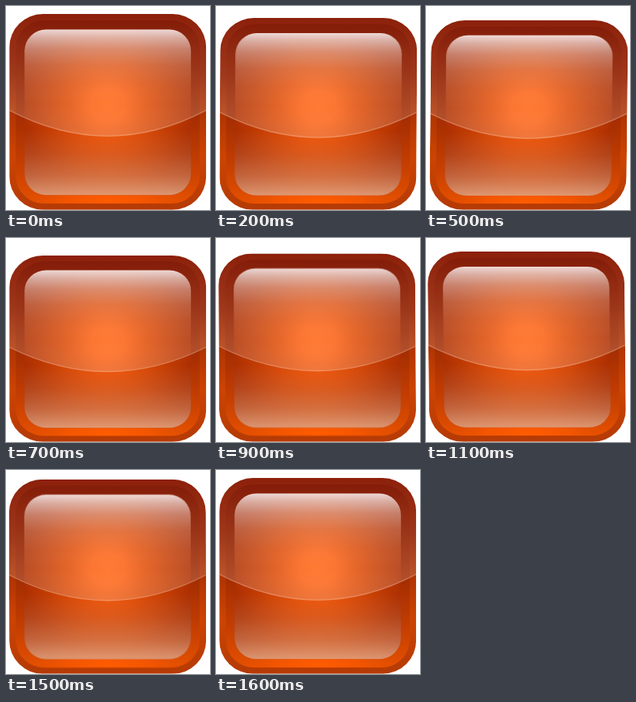
Animation, 256 px wide and 256 px high, one loop 1.7 s. Source, as an HTML page:

```html
<!DOCTYPE html>
<html lang="en">
<head>
<meta charset="utf-8">
<title>Wobbling glossy button</title>
<style>
html, body { margin: 0; width: 100%; height: 100%; overflow: hidden; background: #fff; }
svg { display: block; width: 100%; height: 100%; }
</style>
</head>
<body>
<svg viewBox="0 0 256 256">
  <defs>
    <linearGradient id="rim" x1="0" y1="0" x2="0" y2="1">
      <stop offset="0" stop-color="#8a1c06"/>
      <stop offset=".3" stop-color="#962404"/>
      <stop offset=".5" stop-color="#b03402"/>
      <stop offset=".72" stop-color="#cc4402"/>
      <stop offset="1" stop-color="#b43a06"/>
    </linearGradient>
    <linearGradient id="band" x1="0" y1="0" x2="0" y2="1">
      <stop offset="0" stop-color="#801602"/>
      <stop offset=".5" stop-color="#a22c02"/>
      <stop offset=".75" stop-color="#c03c02"/>
      <stop offset="1" stop-color="#e45000"/>
    </linearGradient>
    <radialGradient id="glow" gradientUnits="userSpaceOnUse" cx="0" cy="0" r="1" gradientTransform="translate(123 234) scale(105 30)">
      <stop offset="0" stop-color="#ff5c00"/>
      <stop offset=".5" stop-color="#fa5800" stop-opacity=".7"/>
      <stop offset="1" stop-color="#e45000" stop-opacity="0"/>
    </radialGradient>
    <radialGradient id="core" gradientUnits="userSpaceOnUse" cx="123" cy="114" r="140">
      <stop offset="0" stop-color="#ff6412"/>
      <stop offset=".15" stop-color="#fb5f10"/>
      <stop offset=".35" stop-color="#e04c06"/>
      <stop offset=".55" stop-color="#c63e04"/>
      <stop offset=".75" stop-color="#ae3002"/>
      <stop offset="1" stop-color="#962400"/>
    </radialGradient>
    <linearGradient id="shine" x1="0" y1="0" x2="0" y2="1">
      <stop offset="0" stop-color="#f8f2f6" stop-opacity=".86"/>
      <stop offset=".05" stop-color="#f0e8ec" stop-opacity=".66"/>
      <stop offset=".12" stop-color="#eee0e4" stop-opacity=".42"/>
      <stop offset=".22" stop-color="#eedcdc" stop-opacity=".2"/>
      <stop offset=".33" stop-color="#f0e0e0" stop-opacity=".07"/>
      <stop offset=".45" stop-color="#fff" stop-opacity="0"/>
      <stop offset=".6" stop-color="#ffc8a0" stop-opacity="0"/>
      <stop offset=".75" stop-color="#ffc8a0" stop-opacity=".16"/>
      <stop offset=".88" stop-color="#ffc8a0" stop-opacity=".38"/>
      <stop offset="1" stop-color="#ffd0ac" stop-opacity=".66"/>
    </linearGradient>
    <linearGradient id="gloss" x1="0" y1="0" x2="0" y2="1">
      <stop offset="0" stop-color="#fff" stop-opacity=".02"/>
      <stop offset=".4" stop-color="#fff" stop-opacity=".08"/>
      <stop offset="1" stop-color="#fff" stop-opacity=".19"/>
    </linearGradient>
    <clipPath id="shape"><rect width="246" height="246" rx="42"/></clipPath>
    <filter id="soft" x="-5%" y="-5%" width="110%" height="110%"><feGaussianBlur stdDeviation=".6"/></filter>
  </defs>
  <g id="button">
    <g clip-path="url(#shape)">
      <rect width="246" height="246" fill="url(#rim)"/>
      <g filter="url(#soft)">
        <rect x="8" y="8" width="230" height="230" rx="35" fill="url(#band)"/>
        <rect x="8" y="8" width="230" height="230" rx="35" fill="url(#glow)"/>
        <rect x="19" y="19.5" width="208" height="208" rx="27" fill="url(#core)"/>
        <rect x="19" y="19.5" width="208" height="208" rx="27" fill="url(#shine)"/>
      </g>
      <path d="M0 0H246V121.5Q123 186 0 121.5Z" fill="url(#gloss)"/>
      <path d="M0 121Q123 185.5 246 121" fill="none" stroke="#ffd8c0" stroke-opacity=".28" stroke-width="1.4"/>
    </g>
  </g>
</svg>
<script>
const LOOP = 1700, STEP = 100, SIZE = 246;
const LEFT = 4.2, WIDTH = 247, BOTTOM = 255.8;
const button = document.getElementById('button');

// time, top edge, sideways lean of the top
const poses = [
  [0, 10, 0],
  [200, 15, 1.3],
  [500, 18, 2.5],
  [700, 22, 0],
  [1100, 17, -2.5],
  [1300, 15, -1.3],
  [1600, 10, 0]
];

function poseAt(t) {
  const i = Math.max(1, poses.findIndex(p => p[0] >= t));
  const [t0, top0, lean0] = poses[i - 1], [t1, top1, lean1] = poses[i];
  const k = (t - t0) / (t1 - t0);
  return { top: top0 + (top1 - top0) * k, lean: lean0 + (lean1 - lean0) * k };
}

function draw(now) {
  const { top, lean } = poseAt(Math.floor((now % LOOP) / STEP) * STEP);
  const m = [WIDTH / SIZE, 0, -lean / SIZE, (BOTTOM - top) / SIZE, LEFT + lean, top];
  button.setAttribute('transform', `matrix(${m.join(' ')})`);
}

const start = performance.now();
function tick(now) {
  draw(Math.max(0, now - start));
  requestAnimationFrame(tick);
}
draw(0);
requestAnimationFrame(tick);
</script>
</body>
</html>
```
